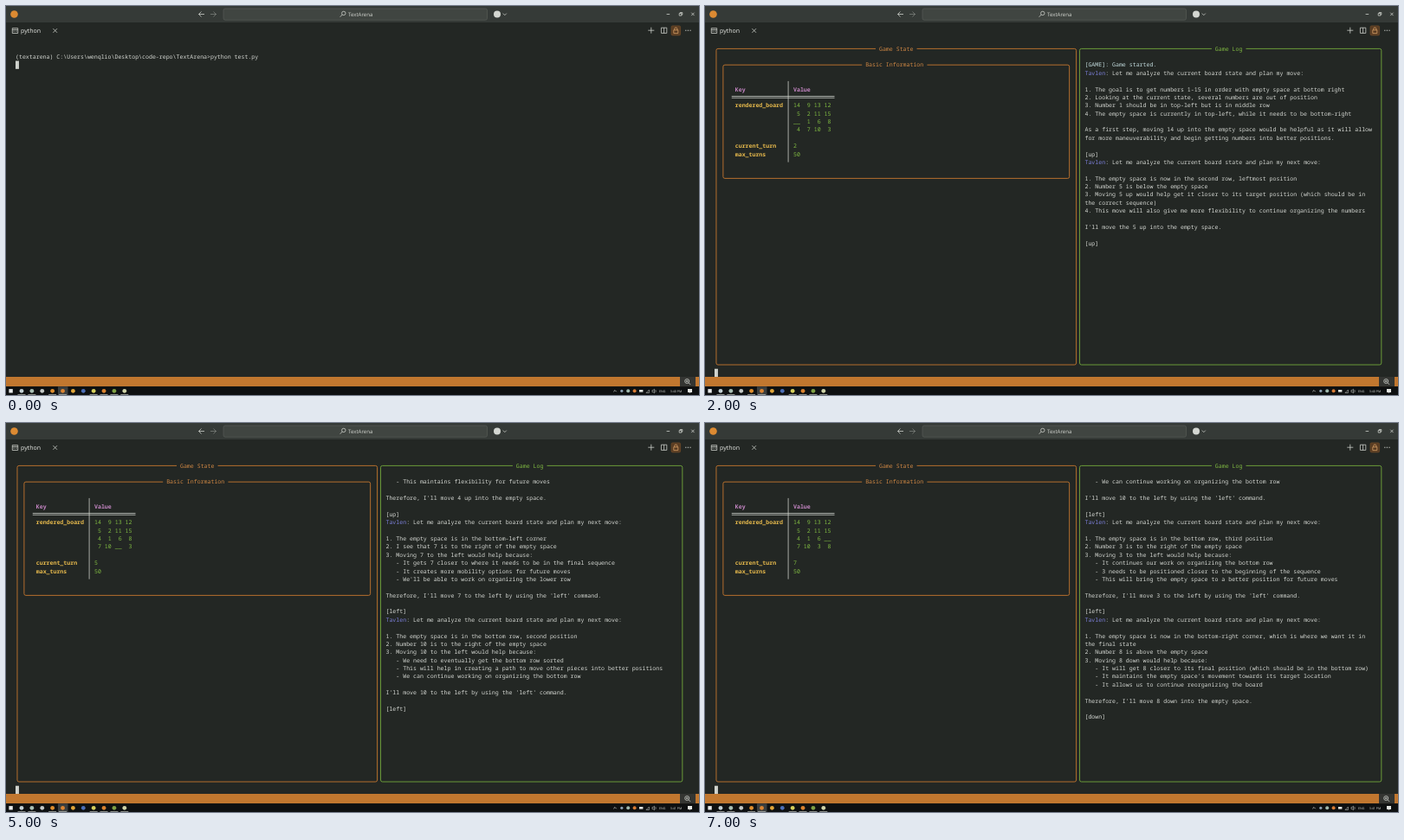
Write an HTML page that moves like this. It is 800 px wide and 450 px high and loops after 8000 ms.

```html
<!DOCTYPE html>
<html lang="en">
<head>
<meta charset="utf-8">
<title>TextArena</title>
<style>
  html, body { margin: 0; width: 100%; height: 100%; overflow: hidden; background: #232724; }
  svg { display: block; width: 800px; height: 450px; }
  text { white-space: pre; text-rendering: geometricPrecision; font-family: "Open Sans", sans-serif; fill: #d4d7d2; }
  #terminal text { font: 6.597px "Noto Sans Mono", monospace; }
  #terminal .bold { font-weight: 700; }
  .line { fill: none; stroke: #d4d7d2; stroke-width: .75; }
</style>
</head>
<body>
<svg viewBox="0 0 800 450">
  <rect width="800" height="450" fill="#232724"/>

  <!-- title bar -->
  <rect width="800" height="19" fill="#353a37"/>
  <circle cx="9.5" cy="9.5" r="4.3" fill="#dc8a32"/>
  <path class="line" d="M229 9.5h-6.5m3-3l-3 3l3 3"/>
  <path class="line" d="M236 9.5h6.5m-3-3l3 3l-3 3" opacity=".45"/>
  <rect x="251" y="3" width="304.5" height="13.2" rx="2" fill="#404541" stroke="#565b57" stroke-width=".7"/>
  <g class="line"><circle cx="389.8" cy="8.4" r="2.2"/><path d="M388.2 10l-2.5 2.7"/></g>
  <text x="395" y="11.8" font-size="6.1">TextArena</text>
  <circle cx="567" cy="9.5" r="4" fill="#d4d7d2"/>
  <path class="line" d="M573.8 8.6l2 2l2-2"/>
  <path class="line" d="M762.6 9.5h3.6M777.2 8.5h2.6v2.6h-2.6zM778.2 8.5v-1h2.6v2.6h-1M791.2 7.7l3.4 3.4m0-3.4l-3.4 3.4" stroke-width=".6"/>

  <!-- tab row -->
  <path class="line" d="M7.3 25.7h6.4v5.8h-6.4zM7.3 27.4h6.4M8.5 29.2h1.5m1 0h1.5"/>
  <text x="17" y="31.2" font-size="7" style="fill:#eceeea">python</text>
  <path class="line" d="M54.4 26.2l4.6 4.6m0-4.6l-4.6 4.6M741.3 28.2h7m-3.5-3.5v7M756.4 25.2h6.4v6.2h-6.4zM759.6 25.2v6.2"/>
  <rect x="768" y="22.9" width="10.6" height="11" rx="1.5" fill="#583c23" stroke="#7b512b" stroke-width=".6"/>
  <path class="line" d="M770.8 27.8h5v3.8h-5zM771.7 27.8v-1.2a1.6 1.6 0 0 1 3.2 0v1.2" style="stroke:#e0a76a"/>
  <path d="M784.2 28.2h1.2m1.4 0h1.2m1.4 0h1.2" stroke="#d4d7d2" stroke-width="1.1"/>

  <g id="terminal"></g>

  <!-- status bar -->
  <rect y="429" width="800" height="11.2" fill="#c1772f"/>
  <rect x="778" y="429" width="18" height="11.2" fill="#343532"/>
  <g class="line"><circle cx="786.2" cy="434" r="2.5"/><path d="M788 435.8l2.2 2.2M785 434h2.4m-1.2-1.2v2.4"/></g>

  <!-- taskbar -->
  <rect y="440.2" width="800" height="9.8" fill="#0e1011"/>
  <rect x="60" y="440.2" width="11.5" height="9.8" fill="#3b3e3e"/>
  <g id="icons"></g>
  <path class="line" d="M701.3 446.2l1.7-1.7l1.7 1.7" stroke-width=".6"/>
  <path class="line" d="M739 447.5l3.4-3.4v3.4zM746 444.5h1l1.5-1.2v4.4l-1.5-1.2h-1zM749.7 444a2.5 2.5 0 0 1 0 3" stroke-width=".5" opacity=".7"/>
  <text x="754" y="446.8" font-size="3.6">ENG</text>
  <text id="clock" x="766.7" y="446.8" font-size="3.6"></text>
  <path d="M787 443h5v4h-2l-1 1.2v-1.2h-2z" fill="#e4e6e2"/>
</svg>

<script>
const CELL = 3.958, ROW = 9.375, LEFT = 11, TOP = 49.4;
const TEXT = "#d4d7d2", ORANGE = "#c4762f", GREEN = "#72a83c", VALUE = "#80bb42", KEY = "#e6b94c", HEAD = "#c586c4";
const PLAYER = "Tavlen";
const $ = id => document.getElementById(id);
const colX = col => LEFT + col * CELL;
const rowY = row => TOP + row * ROW;

const intro = `${PLAYER}: Let me analyze the current board state and plan my`;
const log = [
`[GAME]: Game started.
${intro} move:

1. The goal is to get numbers 1-15 in order with empty space at bottom right
2. Looking at the current state, several numbers are out of position
3. Number 1 should be in top-left but is in middle row
4. The empty space is currently in top-left, while it needs to be bottom-right

As a first step, moving 14 up into the empty space would be helpful as it will allow
for more maneuverability and begin getting numbers into better positions.

[up]`,
`${intro} next move:

1. The empty space is now in the second row, leftmost position
2. Number 5 is below the empty space
3. Moving 5 up would help get it closer to its target position (which should be in
the correct sequence)
4. This move will also give me more flexibility to continue organizing the numbers

I'll move the 5 up into the empty space.

[up]`,
`${intro} next move:

1. The empty space is now in the third row, leftmost position
2. Number 4 is below the empty space
3. Moving 4 up would be beneficial because:
   - 4 needs to be closer to the beginning of the sequence
   - This maintains flexibility for future moves

Therefore, I'll move 4 up into the empty space.

[up]`,
`${intro} next move:

1. The empty space is in the bottom-left corner
2. I see that 7 is to the right of the empty space
3. Moving 7 to the left would help because:
   - It gets 7 closer to where it needs to be in the final sequence
   - It creates more mobility options for future moves
   - We'll be able to work on organizing the lower row

Therefore, I'll move 7 to the left by using the 'left' command.

[left]`,
`${intro} next move:

1. The empty space is in the bottom row, second position
2. Number 10 is to the right of the empty space
3. Moving 10 to the left would help because:
   - We need to eventually get the bottom row sorted
   - This will help in creating a path to move other pieces into better positions
   - We can continue working on organizing the bottom row

I'll move 10 to the left by using the 'left' command.

[left]`,
`${intro} next move:

1. The empty space is in the bottom row, third position
2. Number 3 is to the right of the empty space
3. Moving 3 to the left would help because:
   - It continues our work on organizing the bottom row
   - 3 needs to be positioned closer to the beginning of the sequence
   - This will bring the empty space to a better position for future moves

Therefore, I'll move 3 to the left by using the 'left' command.

[left]`,
`${intro} next move:

1. The empty space is now in the bottom-right corner, which is where we want it in
the final state
2. Number 8 is above the empty space
3. Moving 8 down would help because:
   - It will get 8 closer to its final position (which should be in the bottom row)
   - It maintains the empty space's movement towards its target location
   - It allows us to continue reorganizing the board

Therefore, I'll move 8 down into the empty space.

[down]`];
const firstLine = [0, 0, 0, 3, 16, 29, 41, 53];   // scroll position for each turn
const gapMoves = [4, 4, 4, 1, 1, 1, -4];          // how the empty cell travels

const write = (row, col, text, color = TEXT, cls = "") =>
  `<text x="${colX(col)}" y="${rowY(row) + 2.3}" class="${cls}" style="fill:${color}">${text}</text>`;

const cursor = row =>
  `<rect x="${LEFT}" y="${rowY(row) - ROW / 2}" width="${CELL}" height="${ROW}" fill="#cfd2cc"/>`;

function panel(col1, row1, col2, row2, title, titleCol, color, titleColor) {
  const x = colX(col1 + .5), y = rowY(row1);
  return `<rect x="${x}" y="${y}" width="${(col2 - col1) * CELL}" height="${(row2 - row1) * ROW}" rx="2"
      fill="none" stroke="${color}" stroke-width=".9"/>
    <rect x="${colX(titleCol - 1)}" y="${y - 2}" width="${(title.length + 2) * CELL}" height="4" fill="#232724"/>`
    + write(row1, titleCol, title, titleColor);
}

function boardRows(turn) {
  const cells = [0, 9, 13, 12, 14, 2, 11, 15, 5, 1, 6, 8, 4, 7, 10, 3];
  let gap = 0;
  for (const step of gapMoves.slice(0, turn)) {
    cells[gap] = cells[gap + step];
    cells[gap += step] = 0;
  }
  const names = cells.map(n => n ? String(n).padStart(2) : "__");
  return [0, 4, 8, 12].map(i => names.slice(i, i + 4).join(" "));
}

function logLine(line, i) {
  const row = i + 2, col = 108;
  if (line.startsWith("[GAME]")) return write(row, col, line, "#c3dcde");
  if (!line.startsWith(PLAYER)) return write(row, col, line);
  return write(row, col, PLAYER, "#7b7fd8") + write(row, col + PLAYER.length, line.slice(PLAYER.length));
}

function gameScreen(turn) {
  const lines = log.slice(0, turn).join("\n").split("\n").slice(firstLine[turn]);
  const ruleY = rowY(6) - .3;
  return panel(0, 0, 105, 39, "Game State", 48, ORANGE, "#cf8744")
    + panel(2, 2, 103, 16, "Basic Information", 44, ORANGE, "#cf8744")
    + panel(106, 0, 194, 39, "Game Log", 146, GREEN, VALUE)
    + `<path class="line" d="M${colX(21.5)} ${rowY(4)}V${rowY(14)}M${colX(5)} ${ruleY - .9}H${colX(35)}M${colX(5)} ${ruleY + .9}H${colX(35)}"/>`
    + write(5, 6, "Key", HEAD, "bold") + write(5, 23, "Value", HEAD, "bold")
    + write(7, 6, "rendered_board", KEY, "bold")
    + boardRows(turn).map((cells, i) => write(7 + i, 23, cells, VALUE)).join("")
    + write(12, 6, "current_turn", KEY, "bold") + write(12, 23, turn, VALUE)
    + write(13, 6, "max_turns", KEY, "bold") + write(13, 23, 50, VALUE)
    + lines.map(logLine).join("")
    + cursor(40);
}

const promptScreen = () =>
  write(1, 0, String.raw`(textarena) C:\Users\wenqlio\Desktop\code-repo\TextArena>python test.py`) + cursor(2);

const square = (x, size, color) =>
  `<rect x="${x - size / 2}" y="${445.3 - size / 2}" width="${size}" height="${size}" fill="${color}"/>`;
const dot = (x, r, color) => `<circle cx="${x}" cy="445.3" r="${r}" fill="${color}"/>`;
const apps = ["#c3d0d4", "#a9bfb4", "#c4c8c6", "#dd8d2e", "#d98331", "#e0a53a", "#4d6fb8", "#d5cf5c", "#d9822f", "#7fa044", "#cfd3a8"];
$("icons").innerHTML = square(5.6, 4.4, "#e8eaea")
  + apps.map((color, i) => {
      const x = 18 + i * 11.88;
      const underline = i == 2 || i == 5 || i == 6 ? "" : `<path d="M${x - 4.5} 449.5h9" stroke="#a9aca8" stroke-width=".8"/>`;
      return dot(x, 2.4, color) + underline;
    }).join("")
  + dot(710.8, 1.6, "#8fa3b5") + dot(718.2, 2, "#9fb9ae") + dot(725.6, 2, "#d77b35")
  + `<rect x="731" y="444" width="4.4" height="2.6" fill="#dfe2de"/>`;

let shown = -1;
function frame(now) {
  const turn = Math.floor(now % 8000 / 1000);
  if (turn !== shown) {
    shown = turn;
    $("terminal").innerHTML = turn ? gameScreen(turn) : promptScreen();
    $("clock").textContent = turn < 4 ? "3:40 PM" : "3:41 PM";
  }
  requestAnimationFrame(frame);
}
frame(performance.now());
</script>
</body>
</html>
```
